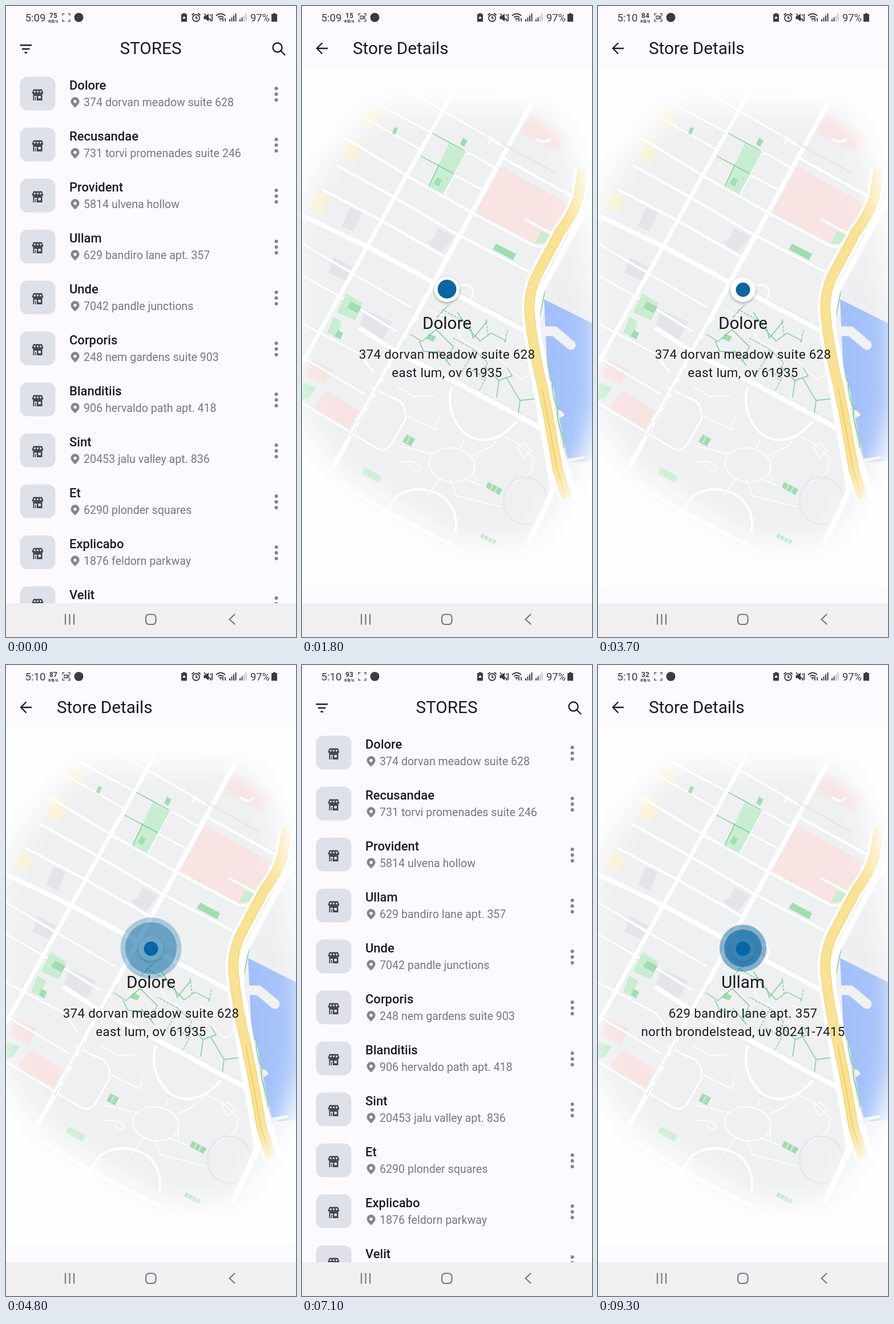
Write an HTML page that moves like this. It is 508 px wide and 1102 px high and loops after 9.4 s.

```html
<!DOCTYPE html>
<html lang="en">
<head>
<meta charset="utf-8">
<title>Store list</title>
<style>
html, body { margin: 0; width: 100%; height: 100%; overflow: hidden; background: #fcfaff; }
svg { display: block; width: 508px; height: 1102px; font-family: Roboto, sans-serif; fill: #1a1b1e; }
.line { fill: none; stroke: #1b1b1e; stroke-width: 2.3; }
.head { font-size: 29.66px; }
.mid { text-anchor: middle; }
.name { font-size: 22px; font-weight: 500; }
.addr { font-size: 19.6px; fill: #77787b; }
.detail { font-size: 22.25px; letter-spacing: .37px; text-anchor: middle; }
.paths { fill: none; stroke: #fff; stroke-width: 1.6; }
.campus { fill: none; stroke: #74cd8f; stroke-width: 1.4; }
</style>
</head>
<body>
<svg viewBox="0 0 508 1102">
  <defs>
    <filter id="soft" x="-30%" y="-30%" width="160%" height="160%"><feGaussianBlur stdDeviation="22"/></filter>
    <filter id="haze" x="-50%" y="-50%" width="200%" height="200%"><feGaussianBlur stdDeviation="5"/></filter>
    <filter id="shade" x="-50%" y="-50%" width="200%" height="200%"><feGaussianBlur stdDeviation="2.5"/></filter>
    <mask id="fade" maskUnits="userSpaceOnUse" x="0" y="108" width="508" height="903">
      <path filter="url(#soft)" fill="#fff" d="M130 178L425 180L472 260L486 340L505 460L520 560V700L490 790L455 850L400 935H270L70 815L-10 700V380L30 290Z"/>
    </mask>
    <linearGradient id="sea" x2="1" y2="0"><stop stop-color="#a1bffa"/><stop offset="1" stop-color="#a9c5fb"/></linearGradient>
    <g id="shop" fill="#41464d">
      <path d="M48 145.500H63L65.500 152Q64 155 61 153.500Q58 155.500 55.500 153.500Q53 155.500 50 153.500Q47 155 45.500 152Z"/>
      <path d="M47.500 154H63.500V165H47.500Z"/>
      <path d="M49.500 148H52L51.500 151H48.500ZM54.200 148H56.800V151H54.200ZM59 148H61.500L62.500 151H59.500ZM49.500 157H54V165H52.500V159H51V165H49.500ZM56.500 157H61V161.500H56.500Z" fill="#dee1ea"/>
    </g>
    <path id="pin" fill="#858589" fill-rule="evenodd" d="M121 177.500C116 172.500 113.500 170 113.500 166.500A7.500 7.500 0 0 1 128.500 166.500C128.500 170 126 172.500 121 177.500ZM121 164A2.700 2.700 0 1 0 121 169.400A2.700 2.700 0 1 0 121 164Z"/>
    <path id="highway" fill="none" d="M492 285L484 335Q474 366 452 394L414 465Q395 500 399 540Q405 600 421 665Q436 735 447 805L464 860"/>
  </defs>

  <g id="list">
    <rect width="508" height="1043" fill="#fcfaff"/>
    <rect id="press" width="508" height="89" fill="#000"/>
    <path class="line" d="M24.500 68.500H45M28 75H41.500M32.500 81.500H37"/>
    <text class="head mid" x="253.500" y="84">STORES</text>
    <g class="line"><circle cx="475.500" cy="72.500" r="8"/><path d="M481.500 78.500L489 86"/></g>
    <g id="rows"></g>
  </g>
  <rect id="scrim" width="508" height="1043" fill="#000"/>

  <g id="page">
    <rect width="508" height="1043" fill="#fcfaff"/>
    <rect y="108" width="508" height="904" fill="#fefeff"/>
    <g mask="url(#fade)">
      <rect y="108" width="508" height="903" fill="#eff0f2"/>
      <g filter="url(#haze)" opacity=".75">
        <path fill="#fdf2c8" d="M110 170L140 185L126 212L100 205ZM80 225L108 240L94 274L70 266ZM28 325L50 335L35 362L10 350Z"/>
        <path fill="#f9dedd" d="M400 190L470 230L452 256L380 218Z"/>
      </g>
      <path fill="#f8e4e3" d="M348 280L466 345L434 408Q422 423 405 414L303 362ZM20 617L54 636L40 662L4 645ZM42 672L99 706L84 738L18 704Z"/>
      <path fill="#e3e5e9" d="M84 352L105 362L90 394L70 384ZM238 388L266 402L245 432L218 412L232 405ZM55 438L88 455L78 480L46 466ZM110 530L158 552L140 584L100 565Z"/>
      <path fill="#eeeff1" d="M418 455L508 505V560L418 512Z"/>
      <g id="roads"></g>
      <path fill="none" stroke="#e2e4e7" stroke-width="2" d="M350 240L443 291"/>
      <g fill="#c9edd1">
        <path d="M257 240L287 256L247 329L222 316ZM418 393L437 400L429 414L408 415ZM78 502L106 519L93 549L61 535ZM55 543L70 551L61 579L44 571ZM2 657L24 667L12 685L-4 690ZM110 806L140 821L134 832L104 817Z"/>
      </g>
      <g fill="#a2dcb1">
        <path d="M282 230L290 235L284 246L277 241ZM237 299L245 304L239 315L231 310ZM340 415L375 433L370 444L334 425ZM86 516L104 526L98 537L79 527ZM63 566L72 571L67 582L57 577ZM183 748L198 756L191 769L176 761ZM326 831L351 844L346 854L322 841ZM223 572L235 578L230 586L217 581ZM162 211L168 214L163 225L158 222ZM315 921L341 934L338 941L312 928Z"/>
      </g>
      <path stroke="#eff0f2" stroke-width="1.500" d="M189 753L184 763M335 834L329 846M343 838L337 850M321 923L317 933M328 926L324 937M335 929L331 940"/>
      <path class="campus" d="M228 222L285 253M208 262L266 293M240 277L222 315"/>
      <path class="campus" d="M190 573L210 586L235 565L265 595L253 621M205 585L213 603L245 605M257 522L236 544M272 535L293 565L312 585L331 571L358 585M295 563L300 580L325 550M320 630L345 654L368 646L356 625M358 649L382 689L407 686M382 689L379 711M345 654L341 684M237 600L260 628"/>
      <path class="campus" stroke-dasharray="4 2" d="M245 530L290 554M322 547L326 574M265 580L302 600L280 640M303 602L325 622L315 653M360 567L355 588M293 633L322 650L311 671"/>
      <path class="paths" stroke="#e1e4e7" d="M220 530L260 545L282 585L350 620L380 650Q405 653 396 620L340 595"/>
      <path class="paths" d="M222 800A40 29 8 1 0 303 803A40 29 8 1 0 222 800M185 716L234 740L240 715M228 782L170 768M243 824L220 855M283 825L321 840M299 785L330 770L350 750L380 765L407 792L402 815L365 835M300 805L303 830M170 796Q205 792 208 809Q195 816 190 802M165 663L195 682L232 680M278 770L284 757M378 770L390 764L402 778L388 788ZM262 828L270 855L350 875"/>
      <ellipse cx="391" cy="864" rx="38" ry="41" fill="none" stroke="#e5e7ea" stroke-width="3"/>
      <path fill="url(#sea)" d="M424 512L508 554V795L467 797L447 710L430 640Z"/>
      <path fill="none" stroke="#f1f2f4" stroke-width="17" stroke-linecap="round" d="M422 568L442 568L471 592"/>
      <path fill="#f1f2f4" d="M446 706Q456 704 460 715L450 720ZM463 791L494 786L496 790L466 798Z"/>
      <path fill="#cce8d3" d="M426 644L438 655L467 800L450 815Z"/>
      <path class="campus" d="M427 490L417 540M432 646L439 658L438 675L448 703L447 720L459 760L456 785L466 815"/>
      <path fill="none" stroke="#fff" stroke-width="10" d="M508 340L482 382L428 482Q410 510 412 560L449 760L480 860M391 560L440 845L397 940"/>
      <use href="#highway" stroke="#fff" stroke-width="27"/>
      <use href="#highway" stroke="#f2cb68" stroke-width="17.500"/>
      <use href="#highway" stroke="#fae293" stroke-width="15.500"/>
      <path fill="none" stroke="#f1c75c" stroke-width="1.500" d="M420 665Q434 735 446 805L462 855"/>
    </g>
    <path class="line" d="M35.500 64.500L26 74L35.500 83.500M26 74H45"/>
    <text class="head" x="89" y="84">Store Details</text>
    <circle cx="254" cy="497" r="22" fill="#000" opacity=".3" filter="url(#shade)"/>
    <circle cx="254" cy="495" r="22" fill="#fff"/>
    <circle class="wave" cx="254" cy="494.500" fill="#0766a0"/>
    <circle class="wave" cx="254" cy="494.500" fill="#0766a0"/>
    <circle cx="254" cy="495.500" r="12.500" fill="#0766a3"/>
    <text id="storeName" class="head mid" x="254" y="563.500"></text>
    <text id="street" class="detail" x="254" y="615.500"></text>
    <text id="city" class="detail" x="254" y="647.500"></text>
  </g>

  <g fill="#3c3c3f">
    <text id="clock" x="33.500" y="27" font-size="18.700"></text>
    <g class="mid" font-weight="700">
      <text id="speed" x="83" y="20.500" font-size="12"></text>
      <text x="83" y="29" font-size="8">KB/s</text>
    </g>
    <g fill="none" stroke="#4a4a4d" stroke-width="1.300">
      <path d="M99 17V13.500H102.500M108.500 13.500H112V17M112 23V26.500H108.500M102.500 26.500H99V23"/>
      <path id="camera" d="M102 17.500H107V22.500H102ZM107 19.500L110 17.500V22.500L107 20.500"/>
    </g>
    <circle cx="127.500" cy="20" r="8"/>
    <path d="M309.500 12.500H314.500V14H317V27.500H307V14H309.500Z"/>
    <path d="M309 22L312 17.500L315 22Z" fill="#fcfaff"/>
    <g fill="none" stroke="#3c3c3f" stroke-width="1.800">
      <circle cx="333" cy="21" r="6"/>
      <path d="M333 17.500V21.500H336M325.500 16L329.500 12.500M336.500 12.500L340.500 16M347 13L360 27M358 15V17M358 22V25M361 14V26"/>
      <path d="M368 17Q376 10 384 17M371 20Q376 16 381 20M373.500 23Q376 21 378.500 23M380 27V21M384 21V27"/>
    </g>
    <path d="M346.500 17.500H350L355 13V27L350 23H346.500ZM374.500 24H377.500L376 26ZM391 23H393V27H391ZM394.500 20H396.500V27H394.500ZM398 16.500H400V27H398ZM401.500 13H403.500V27H401.500ZM409 23H411V27H409ZM412.500 20H414.500V27H412.500Z"/>
    <path opacity=".3" d="M416 16.500H418V27H416ZM419.500 13H421.500V27H419.500Z"/>
    <text x="428" y="27" font-size="18.300">97%</text>
    <path d="M468 12.500H472V14H475V27.500H465V14H468Z"/>
  </g>

  <rect y="1043" width="508" height="59" fill="#f1eff2"/>
  <g fill="none" stroke="#7b7a7e" stroke-width="2.200">
    <path d="M104 1062V1080.500M111.500 1062V1080.500M119 1062V1080.500M401 1062L391.500 1071L401 1080"/>
    <rect x="245" y="1062.500" width="17.500" height="17.500" rx="5.500"/>
  </g>
</svg>
<script>
const LOOP = 9400, ROW = 89, ZOOM = 300;
const $ = id => document.getElementById(id);
const clamp = v => Math.min(1, Math.max(0, v));
const ramp = (t, from, to) => clamp((t - from) / (to - from));

const stores = [
  ['Dolore', '374 dorvan meadow suite 628', 'east lum, ov 61935'],
  ['Recusandae', '731 torvi promenades suite 246'],
  ['Provident', '5814 ulvena hollow'],
  ['Ullam', '629 bandiro lane apt. 357', 'north brondelstead, uv 80241-7415'],
  ['Unde', '7042 pandle junctions'],
  ['Corporis', '248 nem gardens suite 903'],
  ['Blanditiis', '906 hervaldo path apt. 418'],
  ['Sint', '20453 jalu valley apt. 836'],
  ['Et', '6290 plonder squares'],
  ['Explicabo', '1876 feldorn parkway'],
  ['Velit', '']
];
$('rows').innerHTML = stores.map(([name, street], i) => `
  <g transform="translate(0 ${i * ROW})">
    <rect x="24.500" y="123.500" width="62" height="59" rx="13" fill="#dee1ea"/>
    <use href="#shop"/><use href="#pin"/>
    <text class="name" x="111" y="146">${name}</text>
    <text class="addr" x="136" y="174.500">${street}</text>
    <g fill="#828286">${[144, 154, 164].map(y => `<circle cx="473.500" cy="${y}" r="3"/>`).join('')}</g>
  </g>`).join('');

const roads = [
  ['M405 165L55 805', 9], ['M265 150L0 625', 8],
  ['M-5 363L118 422L253 495L395 570', 9], ['M100 562L165 604L290 668L425 741', 9],
  ['M130 170L228 222M190 150L245 182L355 245M100 190L208 251', 4],
  ['M75 230L190 300L300 362L405 418Q425 425 435 410L478 335L355 267', 5],
  ['M60 278L165 336L270 398L410 471M35 320L145 378L250 438', 5],
  ['M0 415L90 468L190 526M0 470L70 510L165 568M-5 552L100 607L125 640M-5 610L110 678', 4],
  ['M249 328L283 262Q289 254 299 260L340 284M267 295L314 320M390 372L438 398', 4],
  ['M326 241L330 233L348 243M410 230Q420 243 435 232', 4],
  ['M270 489L285 487Q299 487 299 500Q299 514 285 515', 4],
  ['M262 665Q250 710 285 747Q330 777 377 725', 5],
  ['M-5 690L130 772Q148 782 160 760L181 722Q185 690 155 683L120 665', 4],
  ['M142 888L165 857Q200 832 245 855Q275 880 269 920', 5],
  ['M70 835L148 883L270 945M148 883L115 940', 6]
];
const drawRoads = (color, extra) => roads.map(([d, width]) =>
  `<path d="${d}" fill="none" stroke="${color}" stroke-width="${width + extra}" stroke-linejoin="round"/>`).join('');
$('roads').innerHTML = drawRoads('#e5e7ea', 1.5) + drawRoads('#fff', 0) +
  '<path d="M195 557L85 752M275 500L392 561M290 661L418 728M80 838L250 930" fill="none" stroke="#e8eaed" stroke-width="2" stroke-dasharray="22 7"/>';

const visits = [
  { store: 0, press: 1300, open: 1500, close: 6400 },
  { store: 3, press: 7800, open: 8400, close: Infinity }
];
const speeds = [[0, 75], [400, 15], [2400, 84], [4400, 87], [6400, 93], [7400, 32]];

function bezier(x1, y1, x2, y2, x) {
  const at = (a, b, s) => 3 * (1 - s) ** 2 * s * a + 3 * (1 - s) * s * s * b + s ** 3;
  let low = 0, high = 1;
  for (let i = 0; i < 24; i++) {
    const s = (low + high) / 2;
    if (at(x1, x2, s) < x) low = s; else high = s;
  }
  return at(y1, y2, low);
}
const zoomEase = u => u < 1 / 6
  ? .4 * bezier(.05, 0, .1333, .06, u * 6)
  : .4 + .6 * bezier(.2083, .82, .25, 1, (u - 1 / 6) * 1.2);

function drawWaves(age) {
  document.querySelectorAll('.wave').forEach((wave, i) => {
    const u = (age % 2100 - i * 200) / 1750;
    const visible = age >= 0 && u > 0 && u <= 1;
    wave.setAttribute('r', visible ? 4 + 72 * u : 0);
    wave.setAttribute('opacity', visible ? clamp(.2 + 1.3 * (1 - u) ** 2.2) : 0);
  });
}

function render(t) {
  const visit = t < 7000 ? visits[0] : visits[1];
  const [name, street, city] = stores[visit.store];
  $('storeName').textContent = name;
  $('street').textContent = street;
  $('city').textContent = city;

  const enter = clamp((t - visit.open) / ZOOM), leave = clamp((t - visit.close) / ZOOM);
  const scale = leave > 0 ? 1 - .1 * zoomEase(leave) : .85 + .15 * zoomEase(enter);
  const opacity = leave > 0 ? 1 - ramp(leave, .0825, .2075) : ramp(enter, .125, .25);
  $('page').setAttribute('transform', `translate(254 521.5) scale(${scale}) translate(-254 -521.5)`);
  $('page').setAttribute('opacity', opacity);
  $('page').style.display = opacity ? '' : 'none';
  $('scrim').setAttribute('opacity', leave > 0 ? 0 : .6 * ramp(enter, .2075, .4175));

  $('press').setAttribute('y', 109 + visit.store * ROW);
  $('press').setAttribute('opacity', leave > 0 ? 0 : .06 * ramp(t, visit.press, visit.press + 200));
  drawWaves(t - visit.open);

  $('clock').textContent = t < 2400 ? '5:09' : '5:10';
  $('speed').textContent = speeds.filter(([start]) => t >= start).pop()[1];
  const blink = t % 1000;
  $('camera').style.display = blink >= 350 && blink < 850 ? '' : 'none';
}

function tick() {
  render(performance.now() % LOOP);
  requestAnimationFrame(tick);
}
tick();
</script>
</body>
</html>
```
